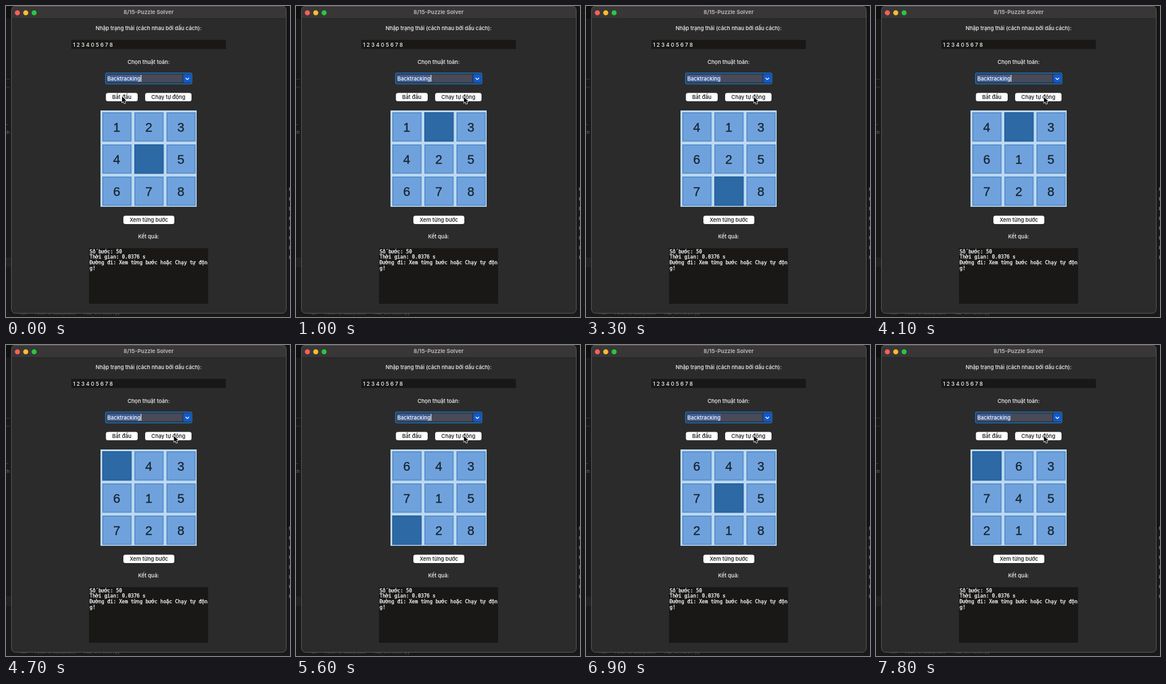
Animation of 496 by 542 pixels, one loop 8 s. Source, as an HTML page with a canvas:

```html
<!DOCTYPE html>
<html lang="vi">
<head>
<meta charset="utf-8">
<title>8/15-Puzzle Solver</title>
<style>
  html, body { margin: 0; width: 100%; height: 100%; overflow: hidden; background: #181818; }
  canvas { display: block; width: 496px; height: 542px; }
</style>
</head>
<body>
<canvas id="stage"></canvas>
<script>
const W = 496, H = 542, LOOP = 8000, TICK = 100;
const UI = 'Inter, "Open Sans", sans-serif';
const BODY = `500 9.25px ${UI}`;
const MONO = '"DejaVu Sans Mono", monospace';
const DIGIT = '"Liberation Sans", Arial, sans-serif';

const canvas = document.getElementById('stage');
const ctx = canvas.getContext('2d');
const dpr = window.devicePixelRatio || 1;
canvas.width = W * dpr;
canvas.height = H * dpr;

// Blank moves, one every STEP ms
const START = [1, 2, 3, 4, 0, 5, 6, 7, 8];
const MOVES = 'ULDDRUULDDRUUL';
const SHIFT = { U: -3, D: 3, L: -1, R: 1 };
const FIRST = 914, STEP = 517;

function boardAfter(count) {
  const board = START.slice();
  for (const move of MOVES.slice(0, count)) {
    const from = board.indexOf(0), to = from + SHIFT[move];
    board[from] = board[to];
    board[to] = 0;
  }
  return board;
}

function rect(x, y, w, h, fill) {
  ctx.fillStyle = fill;
  ctx.fillRect(x, y, w, h);
}

function pill(x, y, w, h, r, fill, stroke) {
  ctx.beginPath();
  ctx.roundRect(x, y, w, h, r);
  if (fill) { ctx.fillStyle = fill; ctx.fill(); }
  if (stroke) { ctx.strokeStyle = stroke; ctx.stroke(); }
}

// "fat" thickens the glyphs without changing their advance
function text(str, x, y, font, color, align = 'left', fat = 0) {
  ctx.font = font;
  ctx.fillStyle = ctx.strokeStyle = color;
  ctx.textAlign = align;
  ctx.fillText(str, x, y);
  if (fat) {
    ctx.lineWidth = fat;
    ctx.lineJoin = 'round';
    ctx.strokeText(str, x, y);
  }
}

function label(str, y) {
  text(str, 249, y, BODY, '#f6f6f6', 'center');
}

function button(str, x, y, w) {
  pill(x, y + 0.4, w, 14.6, 3.5, '#ffffff');
  text(str, x + w / 2, y + 11, BODY, '#0c0c0c', 'center');
}

function backdrop() {
  rect(0, 0, W, H, '#191919');
  rect(0, 0, 9, 22, '#101010');
  rect(0, 438, 9, 17, '#222222');
  rect(490, 0, 6, 320, '#141414');
  const dim = '#777777';
  text('l...', -2, 128, `8px ${UI}`, dim);
  text('...', 0, 142, `8px ${UI}`, dim);
  text('-', 0, 209, `8px ${UI}`, dim);
  text('ch', -3, 223, `8px ${UI}`, dim);
  for (let y = 316; y < 450; y += 17) rect(494.5, y, 1.5, 6, '#6a6a6a');
  text('run  "/Users/someplace" */AB_XY/test.py', 23, 538, `7.5px ${MONO}`, '#555555');
}

function windowFrame() {
  ctx.save();
  pill(9.5, 0, 480, 535.5, 7, '#2b2b2b');
  ctx.clip();
  rect(9, 0, 481, 22, '#393637');
  rect(9, 21.5, 481, 0.8, '#1f1f1f');
  ctx.restore();
  ctx.lineWidth = 1;
  pill(9.5, 0.5, 480, 535, 7, null, '#5c5c5c');
  ['#ff5f57', '#febc2e', '#28c840'].forEach((color, i) => {
    ctx.beginPath();
    ctx.arc(19.9 + i * 14.6, 11.8, 4.4, 0, Math.PI * 2);
    ctx.fillStyle = color;
    ctx.fill();
  });
  text('8/15-Puzzle Solver', 249, 14, `bold 9.5px ${UI}`, '#b4b2b2', 'center');
}

function combo(caretOn) {
  ctx.lineWidth = 1.8;
  pill(174, 116.8, 150.5, 18.8, 2.5, '#2d3138', '#1d6cb0');
  rect(176, 119.3, 132, 13.7, '#484a57');
  rect(176.5, 120, 59, 12.3, '#3f5c94');
  pill(309.5, 118.8, 14, 14.8, 2.5, '#1259cf');
  ctx.strokeStyle = '#ffffff';
  ctx.lineWidth = 1.4;
  ctx.beginPath();
  ctx.moveTo(313.7, 125.2);
  ctx.lineTo(316.7, 128.2);
  ctx.lineTo(319.7, 125.2);
  ctx.stroke();
  text('Backtracking', 177, 129.5, BODY, '#ffffff');
  if (caretOn) rect(235.3, 120, 1.2, 12, '#e8e8e8');
}

function tiles(board) {
  rect(165, 182, 168, 168, '#bddaf3');
  board.forEach((n, i) => {
    const x = 168 + (i % 3) * 56, y = 185 + Math.floor(i / 3) * 56;
    rect(x, y, 51.5, 51.5, n ? '#6fa2dc' : '#2c69a5');
    ctx.lineWidth = 1;
    ctx.strokeStyle = n ? '#4f84be' : '#275f99';
    ctx.strokeRect(x + 1.5, y + 1.5, 48.5, 48.5);
    if (n) text(n, x + 25.3, y + 33.6, `22px ${DIGIT}`, '#1a2633', 'center', 0.4);
  });
}

function results() {
  rect(145, 422, 208, 97, '#191817');
  ['Số bước: 50', 'Thời gian: 0.0376 s', 'Đường đi: Xem từng bước hoặc Chạy tự độn', 'g!']
    .forEach((line, i) => text(line, 146, 430.8 + i * 9.6, `8.55px ${MONO}`, '#f6f6f6', 'left', 0.35));
}

function pointer(x, y) {
  ctx.save();
  ctx.translate(x, y);
  ctx.beginPath();
  [[0, 0], [0, 10.6], [2.4, 8.4], [4, 12.2], [5.9, 11.4], [4.3, 7.7], [7.5, 7.6]]
    .forEach(p => ctx.lineTo(...p));
  ctx.closePath();
  ctx.lineWidth = 1.6;
  ctx.lineJoin = 'round';
  ctx.strokeStyle = '#ffffff';
  ctx.stroke();
  ctx.fillStyle = '#000000';
  ctx.fill();
  ctx.restore();
}

function draw(t) {
  ctx.setTransform(dpr, 0, 0, dpr, 0, 0);
  backdrop();
  windowFrame();
  label('Nhập trạng thái (cách nhau bởi dấu cách):', 41.8);
  rect(114, 59, 270, 16, '#191817');
  text('1 2 3 4 0 5 6 7 8', 117, 70.6, BODY, '#f8f8f8');
  label('Chọn thuật toán:', 100.8);
  combo(t % 900 < 600);
  button('Bắt đầu', 174.5, 151, 55.5);
  button('Chạy tự động', 243, 151, 81);
  tiles(boardAfter(Math.max(0, Math.floor((t - FIRST) / STEP) + 1)));
  button('Xem từng bước', 205, 365, 89);
  label('Kết quả:', 405);
  results();

  const p = Math.min(1, Math.max(0, (t - 200) / 500));
  const ease = p * p * (3 - 2 * p);
  pointer(202.7 + 90.6 * ease, 157.6 + 0.8 * ease);
}

const origin = performance.now();
function frame() {
  const t = (performance.now() - origin) % LOOP;
  draw(Math.floor(t / TICK) * TICK);
  requestAnimationFrame(frame);
}
frame();
</script>
</body>
</html>
```
